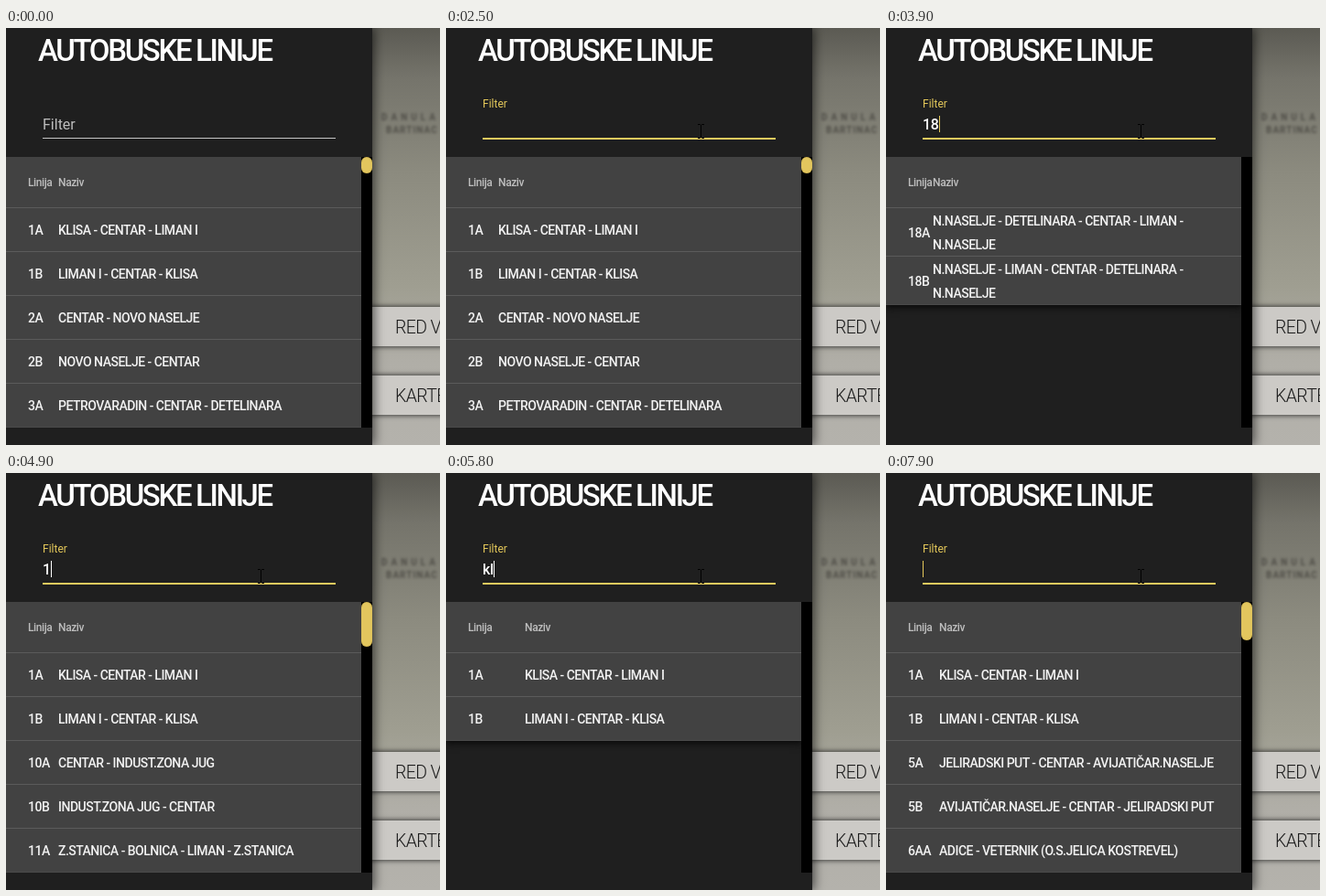
Animation of 474 by 456 pixels, one loop 8000 ms. Source, as an HTML page:

```html
<!DOCTYPE html>
<html lang="sr">
<head>
<meta charset="utf-8">
<title>Autobuske linije</title>
<style>
  html, body { margin: 0; width: 100%; height: 100%; overflow: hidden; }
  body { font-family: Roboto, "Open Sans", sans-serif; color: #fff; }
  div, span, svg { position: absolute; box-sizing: border-box; white-space: pre; }
  #stage {
    left: 0; top: 0; width: 474px; height: 456px; overflow: hidden;
    background: linear-gradient(#5b5a53, #75746b 12%, #8c8b7f 35%, #9f9e91 62%, #b0aea7 80%, #b4b2ac);
  }
  .map { color: #3f3d38; font-size: 10px; font-weight: 700; filter: blur(1.5px); opacity: .75; }
  .button {
    left: 392px; width: 100px; height: 43px; padding-left: 33px;
    background: #cccac6; color: #1c1c1c; font-size: 19.5px; font-weight: 300;
    letter-spacing: -.6px; line-height: 45px; box-shadow: 0 0 5px 1px #222c;
  }
  #panel { left: 0; top: 0; width: 400px; height: 456px; background: #1f1f1f; box-shadow: 0 0 12px 1px #000b; }
  #title { left: 35px; top: 0; font-size: 33px; font-weight: 500; letter-spacing: -2.35px; line-height: 50px; }
  #label { left: 40px; top: 95.5px; font-size: 16px; line-height: 20px; transform-origin: 0 0; }
  #line { left: 40px; top: 120px; width: 320px; height: 1px; background: #c4c4c4; }
  #focus { left: 40px; top: 120px; width: 320px; height: 2px; background: #e6cb5e; }
  #input { left: 40px; top: 96px; font-size: 16px; font-weight: 500; letter-spacing: -.3px; line-height: 20px; }
  #caret { left: 100%; top: 0; width: 1px; height: 18px; }
  #view { left: 0; top: 141px; width: 388px; height: 296px; overflow: hidden; }
  #table { left: 0; top: 0; width: 388px; background: #424242; box-shadow: 0 2px 5px #0008, 0 4px 9px #0005; }
  #table div { position: relative; border-bottom: 1px solid #5b5b5b; }
  #table div:last-child { border-color: #4a4a4a; }
  .head { height: 56px; padding-top: 1px; font-size: 12px; font-weight: 500; letter-spacing: -.4px; line-height: 55px; color: #bebebe; }
  .row { padding-top: 1px; font-size: 14px; font-weight: 500; letter-spacing: -.5px; color: #f2f2f2; }
  .code { left: 24px; }
  #track { left: 388px; top: 141px; width: 12px; height: 296px; background: #000; }
  #thumb { left: 0; top: 0; width: 12px; border-radius: 6px; background: #e2c65e; box-shadow: inset 0 0 1px #a88f3c; }
</style>
</head>
<body>
<div id="stage">
  <div class="map" style="left:410px;top:92px;letter-spacing:4px">DANULA</div>
  <div class="map" style="left:415px;top:106px;letter-spacing:1px">BARTINAC</div>
  <div class="button" style="top:305px">RED VOŽNJE</div>
  <div class="button" style="top:380px">KARTE</div>
  <div id="panel">
    <div id="title">AUTOBUSKE LINIJE</div>
    <div id="label">Filter</div>
    <div id="line"></div>
    <div id="focus"></div>
    <div id="input"><span id="text" style="position:static"></span><span id="caret"></span></div>
    <div id="view"><div id="table"></div></div>
    <div id="track"><div id="thumb"></div></div>
  </div>
  <svg id="arrow" width="13" height="20" viewBox="0 0 13 20">
    <path d="M.5 .5V16L4 12.7 6.5 18.5 9 17.5 6.5 11.8H11.5Z" fill="#fff" stroke="#000"/>
  </svg>
  <svg id="beam" width="9" height="18" viewBox="0 0 9 18">
    <path d="M1 1.5H3.5L4.5 2.5 5.5 1.5H8M4.5 2V16M1 16.5H3.5L4.5 15.5 5.5 16.5H8" fill="none" stroke="#000"/>
  </svg>
</div>
<script>
const $ = id => document.getElementById(id);
const LOOP = 8000, TICK = 100, FOCUS = 1000;
const GREY = [190, 190, 190], GOLD = [228, 200, 90];

const klisa = ["1A|KLISA - CENTAR - LIMAN I", "1B|LIMAN I - CENTAR - KLISA"];
const lists = {
  all: { x: 57, thumb: 18, rows: [...klisa, "2A|CENTAR - NOVO NASELJE",
    "2B|NOVO NASELJE - CENTAR", "3A|PETROVARADIN - CENTAR - DETELINARA"] },
  one: { x: 57, thumb: 49, rows: [...klisa, "10A|CENTAR - INDUST.ZONA JUG",
    "10B|INDUST.ZONA JUG - CENTAR", "11A|Z.STANICA - BOLNICA - LIMAN - Z.STANICA"] },
  eighteen: { x: 51, thumb: 0, rows: ["18A|N.NASELJE - DETELINARA - CENTAR - LIMAN -\nN.NASELJE",
    "18B|N.NASELJE - LIMAN - CENTAR - DETELINARA -\nN.NASELJE"] },
  k: { x: 58, thumb: 42, rows: [...klisa, "5A|JELIRADSKI PUT - CENTAR - AVIJATIČAR.NASELJE",
    "5B|AVIJATIČAR.NASELJE - CENTAR - JELIRADSKI PUT", "6AA|ADICE - VETERNIK (O.S.JELICA KOSTREVEL)"] },
  kl: { x: 86, thumb: 0, rows: klisa }
};

// Steps of [time, value]; each value holds until the next step.
const typed = [[0, ""], [3500, "1"], [3700, "18"], [4800, "1"], [5000, ""], [5300, "k"], [5700, "kl"],
  [6100, "kli"], [6300, "klis"], [6400, "klisa"], [7100, "klis"], [7200, "kli"],
  [7400, "kl"], [7500, "k"], [7700, ""]];
const shown = [[0, "all"], [3600, "one"], [3800, "eighteen"], [4900, "one"], [5100, "all"],
  [5400, "k"], [5800, "kl"], [7800, "k"]];
const caret = [[0, ""], [1000, "#e4c85a"], [1500, ""], [1900, "#e4c85a"], [2500, ""], [3000, "#e4c85a"],
  [4300, ""], [4800, "#fff"], [6900, ""], [7400, "#e4c85a"]];
const pointer = [[100, 300, 2], [300, 330, 100], [500, 425, 300], [600, 448, 394],
  [800, 451, 345], [900, 450, 322], [1000, 278, 113]];

const at = (steps, t) => steps.filter(s => s[0] <= t).pop()[1];
const mix = (a, b, p) => a + (b - a) * p;
const rgb = (a, b, p) => `rgb(${a.map((v, i) => mix(v, b[i], p)).join()})`;
const ease = (t, start, span) => 1 - (1 - Math.min(1, Math.max(0, (t - start) / span))) ** 3;

function fillTable({ x, rows, thumb }) {
  const cells = (code, name) => `<span class="code">${code}</span><span style="left:${x}px">${name}</span>`;
  $("table").innerHTML = `<div class="head">${cells("Linija", "Naziv")}</div>` + rows.map(row => {
    const [code, name] = row.split("|");
    const double = name.includes("\n"), inner = double ? 52 : 47, lead = double ? 26 : 47;
    return `<div class="row" style="height:${inner + 1}px;line-height:${lead}px">` +
      cells(`<span style="line-height:${inner}px">${code}</span>`, name) + "</div>";
  }).join("");
  $("thumb").style.height = thumb + "px";
}

// Moves the pointer and tells whether it is over the filter field.
function place(t) {
  let i = pointer.findIndex(p => p[0] > t);
  if (i < 0) i = pointer.length;
  const a = pointer[Math.max(0, i - 1)], b = pointer[i] || a;
  const p = a === b ? 0 : (t - a[0]) / (b[0] - a[0]);
  const x = mix(a[1], b[1], p), y = mix(a[2], b[2], p);
  const visible = t >= pointer[0][0];
  const over = visible && x > 40 && x < 360 && y > 78 && y < 130;
  $("arrow").style.cssText = `left:${x}px;top:${y}px;display:${visible && !over ? "block" : "none"}`;
  $("beam").style.cssText = `left:${x - 4}px;top:${y - 9}px;display:${over ? "block" : "none"}`;
  return over;
}

let current;
function render(t) {
  const hover = place(t), p = ease(t, FOCUS, 400), focused = t >= FOCUS;
  $("label").style.transform = `translateY(${-20 * p}px) scale(${1 - p / 4})`;
  $("label").style.color = rgb(GREY, GOLD, p);
  $("line").style.height = hover && !focused ? "2px" : "1px";
  $("focus").style.opacity = focused ? mix(.3, 1, p) : 0;
  $("focus").style.transform = `scaleX(${mix(.5, 1, ease(t, FOCUS, 300))})`;
  $("text").textContent = at(typed, t);
  $("caret").style.background = at(caret, t) || "transparent";
  const list = at(shown, t);
  if (list !== current) fillTable(lists[current = list]);
}

function loop() {
  const t = performance.now() % LOOP;
  render(Math.floor(t / TICK) * TICK);
  requestAnimationFrame(loop);
}
loop();
</script>
</body>
</html>
```
